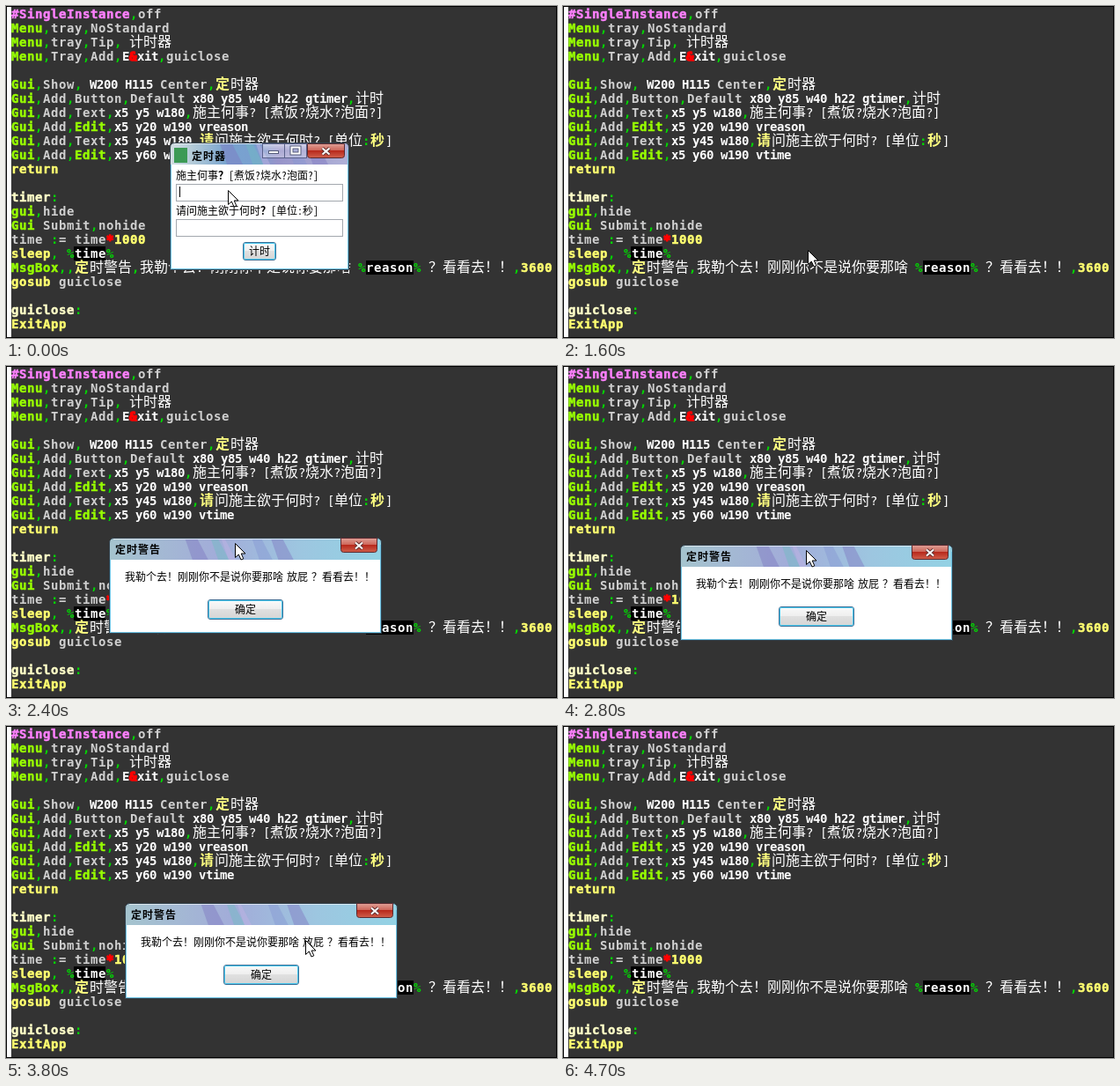
Recreate the animation shown at these times as an HTML page. Size 626x377 px, loop 4.8 s.

```html
<!DOCTYPE html>
<html lang="zh-CN">
<head>
<meta charset="utf-8">
<title>定时器</title>
<style>
html, body { margin: 0; width: 100%; height: 100%; overflow: hidden; background: #333; }
svg { display: block; }
text { white-space: pre; }
.code text { font: bold 14px "DejaVu Sans Mono", monospace; letter-spacing: calc(9px - 1ch); fill: #d0d0d0; }
.code .w { fill: #fff; letter-spacing: calc(8px - 1ch); }
.code .t { fill: #fff; font-weight: normal; letter-spacing: calc(8px - 1ch); }
.code .c, .code .y { font: 16px "Noto Sans CJK SC", "Noto Sans CJK", sans-serif; letter-spacing: 0; fill: #fff; }
.code .y { font-weight: bold; letter-spacing: 1px; fill: #ffff80; }
.code .b { fill: #fff; }
.code .p { fill: #00d800; }
.code .m { fill: #98ff00; stroke: #98ff00; }
.code .k { fill: #ffff70; stroke: #ffff70; }
.code .l { fill: #ffffc8; stroke: #ffffc8; }
.code .d { fill: #ff80ff; stroke: #ff80ff; }
.code .m, .code .k, .code .l, .code .d { stroke-width: .5; }
.code .r { fill: #f00; stroke: #f00; stroke-width: 1.5; }
.ui { font: 12px "Noto Sans Mono CJK SC", "Noto Sans CJK SC", "Noto Sans CJK", sans-serif; fill: #000; }
.title { font-weight: bold; letter-spacing: 1px; }
.strong { font-weight: bold; }
.msg { word-spacing: -2px; }
</style>
</head>
<body>
<svg id="stage" width="626" height="377" viewBox="0 0 626 377">
  <defs>
    <linearGradient id="glassA"><stop offset="0" stop-color="#d3dee2"/><stop offset=".12" stop-color="#b4cbd8"/><stop offset=".32" stop-color="#78a4cf"/><stop offset=".48" stop-color="#7a9fd0"/><stop offset=".6" stop-color="#9693c9"/><stop offset="1" stop-color="#b0b2d8"/></linearGradient>
    <linearGradient id="glassB"><stop offset="0" stop-color="#a5c4ce"/><stop offset=".4" stop-color="#a2acd9"/><stop offset=".7" stop-color="#9dc6e0"/><stop offset="1" stop-color="#93d2e4"/></linearGradient>
    <linearGradient id="face" x2="0" y2="1"><stop offset="0" stop-color="#fafafa"/><stop offset=".5" stop-color="#eee"/><stop offset=".5" stop-color="#e0e0e0"/><stop offset="1" stop-color="#d4d4d4"/></linearGradient>
    <linearGradient id="hot" x2="0" y2="1"><stop offset="0" stop-color="#eaf6fd"/><stop offset=".5" stop-color="#d9f0fc"/><stop offset=".5" stop-color="#bee6fd"/><stop offset="1" stop-color="#a7d9f5"/></linearGradient>
    <linearGradient id="red" x2="0" y2="1"><stop offset="0" stop-color="#e0a097"/><stop offset=".48" stop-color="#cd6457"/><stop offset=".5" stop-color="#b8291c"/><stop offset="1" stop-color="#d0604c"/></linearGradient>
    <linearGradient id="pane" x2="0" y2="1"><stop offset="0" stop-color="#fff" stop-opacity=".55"/><stop offset=".5" stop-color="#fff" stop-opacity=".2"/><stop offset="1" stop-color="#fff" stop-opacity=".35"/></linearGradient>
  </defs>
  <rect width="626" height="377" fill="#000"/>
  <rect x="1" y="1" width="624" height="375" fill="#333"/>
  <rect x="1" y="1" width="5" height="375" fill="#fff"/>
  <rect x="77" y="273" width="36" height="16" fill="#000"/>
  <rect x="409" y="289" width="54" height="16" fill="#000"/>
  <g id="code" class="code"></g>
  <g id="form" class="ui" transform="translate(186 155)"></g>
  <g id="box" class="ui"></g>
  <path id="mouse" d="M.5 .5V16.5L4.3 13L7 19L9.8 17.8L7.2 12H12Z" fill="#fff" stroke="#000"/>
</svg>
<script>
const $ = id => document.getElementById(id);

// <class|text> marks a run; punctuation and Chinese text are coloured by rule.
const lines = [
  '<d|#SingleInstance>,off',
  '<m|Menu>,tray,NoStandard',
  '<m|Menu>,tray,Tip,<w| >计时器',
  '<m|Menu>,Tray,Add,<w|E><r|&amp;><w|xit>,guiclose',
  '',
  '<m|Gui>,Show,<w| W200 H115 >Center,<y|定>时器',
  '<m|Gui>,Add,Button,Default<w| x80 y85 w40 h22 gtimer>,计时',
  '<m|Gui>,Add,Text,<w|x5 y5 w180>,施主何事<t|? [>煮饭<t|?>烧水<t|?>泡面<t|?]>',
  '<m|Gui>,Add,<m|Edit>,<w|x5 y20 w190 vreason>',
  '<m|Gui>,Add,Text,<w|x5 y45 w180>,<y|请>问施主欲于何时<t|? [>单位:<y|秒><t|]>',
  '<m|Gui>,Add,<m|Edit>,<w|x5 y60 w190 vtime>',
  '<k|return>',
  '',
  '<l|timer>:',
  '<m|gui>,hide',
  '<m|Gui> Submit,nohide',
  'time := time<r|*><k|1000>',
  '<k|sleep>, %<b|time>%',
  '<m|MsgBox>,,<y|定>时警告,我勒个去！刚刚你不是说你要那啥<w| >%<b|reason>%<w| >？看看去！！,<k|3600>',
  '<k|gosub> guiclose',
  '',
  '<l|guiclose>:',
  '<k|ExitApp>'
];
const run = (cls, text) => `<tspan class="${cls}">${text}</tspan>`;
const paint = line => line.replace(/<(\w)\|([^>]*)>|([,:%])|([\u4e00-\u9fff！？]+)/g,
  (_, cls, text, mark, han) => cls ? run(cls, text) : mark ? run('p', mark) : run('c', han));
$('code').innerHTML = lines.map((s, i) => `<text x="6" y="${14 + 16 * i}">${paint(s)}</text>`).join('');

const rect = (x, y, w, h, fill, more = '') =>
  `<rect x="${x}" y="${y}" width="${w}" height="${h}" fill="${fill}" ${more}/>`;
const label = (x, y, s, more = '') => `<text x="${x}" y="${y}" ${more}>${s}</text>`;

// Window frame with slanted streaks in its title bar.
function frame(w, h, glass, streaks) {
  const tints = ['#7f78c0', '#6fbcc0', '#c3b4e4', '#8697d2'];
  let s = `<path d="M.5 ${h - .5}V6Q.5 .5 6 .5H${w - 6}Q${w - .5} .5 ${w - .5} 6V${h - .5}Z" fill="url(#${glass})" stroke="#33424e"/>`;
  for (let i = 0; i < streaks; i++) {
    const x = w * .28 + i * 24 + 7 * Math.sin(i * 2.3), d = 9 + 5 * Math.cos(i * 1.7);
    s += `<path d="M${x} 2h${d}l12 23h${-d - 4}Z" fill="${tints[i % 4]}" opacity=".45"/>`;
  }
  return s + `<path d="M5 1.5H${w - 5}" stroke="#fff" opacity=".6"/>` +
    rect(2, 25, w - 4, h - 27, '#fff') +
    `<path d="M${w - 1.5} 8V${h - 1.5}H1.5V25" fill="none" stroke="#6fc4e4"/>`;
}
function closer(x, y, w) {
  const cross = `M${w / 2 - 4} 5l8 7m0 -7l-8 7`;
  return `<g transform="translate(${x} ${y})">` +
    `<path d="M0 0h${w}v13q0 3 -3 3h${6 - w}q-3 0 -3 -3Z" fill="url(#red)" stroke="#5a2a30"/>` +
    `<path d="${cross}" stroke="#63302f" stroke-width="4"/>` +
    `<path d="${cross}" stroke="#fff" stroke-width="2"/></g>`;
}
const button = (id, x, y, w, h, s) =>
  rect(x + .5, y + .5, w - 1, h - 1, 'url(#face)', `id="${id}" rx="2.5" stroke="#3c6f96"`) +
  rect(x + 1.5, y + 1.5, w - 3, h - 3, 'none', 'rx="1.5" stroke="#48c8ee"') +
  label(x + w / 2, y + h / 2 + 4.5, s, 'text-anchor="middle"');
const field = y => rect(7.5, y + .5, 189, 19, '#fff', 'stroke="#a3a8ae"');
const ask = run('strong', '？');

$('form').innerHTML = frame(204, 145, 'glassA', 5) +
  rect(5, 6, 15, 17, '#3c9a55') +
  label(25, 20, '定时器', 'class="title"') +
  rect(105.5, 1.5, 25, 16, 'url(#pane)', 'stroke="#59608a"') +
  rect(130.5, 1.5, 25, 16, 'url(#pane)', 'stroke="#59608a"') +
  rect(112.5, 9.5, 11, 3, '#fff', 'stroke="#555b7a"') +
  rect(138.5, 5.5, 9, 7, 'none', 'stroke="#555b7a" stroke-width="4"') +
  rect(138.5, 5.5, 9, 7, 'none', 'stroke="#fff" stroke-width="2"') +
  closer(156.5, 1.5, 42) +
  label(7, 42, `施主何事${ask}[煮饭?烧水?泡面?]`) + field(47) +
  label(7, 82, `请问施主欲于何时${ask}[单位:秒]`) + field(87) +
  button('go', 83, 113, 38, 21, '计时') +
  label(10, 60, '', 'id="reason"') + label(10, 100, '', 'id="secs"') +
  rect(0, 0, 1, 12, '#000', 'id="caret"');

$('box').innerHTML = frame(310, 109, 'glassB', 5) +
  label(7, 18, '定时警告', 'class="title"') + closer(263.5, .5, 41) +
  label(18, 49, '我勒个去！刚刚你不是说你要那啥 放屁 ？看看去！！', 'class="msg"') +
  button('ok', 112, 70, 86, 23, '确定');

// Paths: time, x, y
const boxPath = [[2000, 137, 201], [2400, 117, 195], [2800, 133, 203], [2900, 138, 192],
  [3000, 140, 193], [3200, 136, 197], [3300, 135, 201]];
const mousePath = [[1000, 252, 209], [1200, 278, 277], [1700, 278, 277], [2000, 280, 207],
  ...boxPath.slice(1).map(([t, x, y]) => [t, x + 143, y + 6]),
  [3600, 352, 245], [3800, 340, 243], [4100, 286, 274]];

function at(path, t) {
  const i = path.findIndex(p => p[0] > t);
  if (i < 0) return path[path.length - 1].slice(1);
  if (i === 0) return path[0].slice(1);
  const a = path[i - 1], b = path[i], k = (t - a[0]) / (b[0] - a[0]);
  return [1, 2].map(n => Math.round(a[n] + (b[n] - a[n]) * k));
}
const move = (el, p) => el.setAttribute('transform', `translate(${p})`);
const show = (el, on) => el.setAttribute('visibility', on ? 'visible' : 'hidden');
const heat = (id, on) => $(id).setAttribute('fill', `url(#${on ? 'hot' : 'face'})`);

function draw(t) {
  const typed = t >= 600, second = t >= 700, number = t >= 800;
  show($('form'), t < 1300);
  show($('box'), t >= 1800 && t < 4500);
  show($('mouse'), t < 4700);
  move($('box'), at(boxPath, t));
  move($('mouse'), at(mousePath, t));
  $('reason').textContent = typed ? '放屁' : '';
  $('secs').textContent = number ? '1' : '';
  move($('caret'), second ? [number ? 17 : 11, 90] : [typed ? 35 : 11, 50]);
  heat('go', t >= 1200);
  heat('ok', t >= 4100);
}
const start = performance.now();
function tick() {
  const t = (performance.now() - start) % 4800;
  draw(Math.floor(t / 100) * 100);
  requestAnimationFrame(tick);
}
tick();
</script>
</body>
</html>
```
